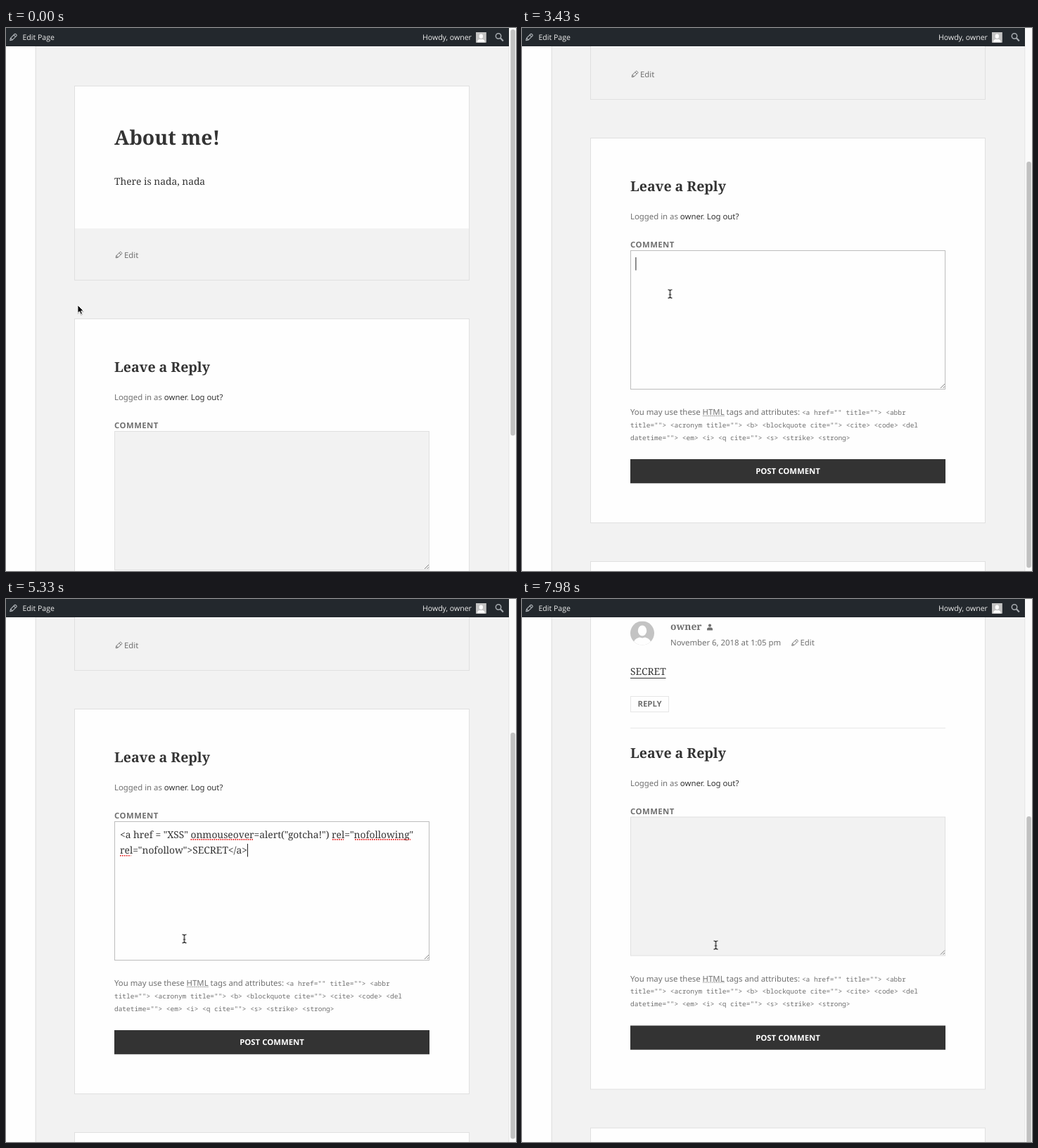
An HTML page for the animation above (8 s loop, 725 by 772 pixels).

```html
<!DOCTYPE html>
<html lang="en">
<head>
<meta charset="utf-8">
<title>Comment form</title>
<style>
html, body { margin: 0; width: 100%; height: 100%; overflow: hidden; background: #f2f2f2; }
svg { display: block; width: 725px; height: 772px; }
text { font: 11.375px "Noto Sans", sans-serif; fill: #707070; white-space: pre; text-rendering: geometricPrecision; }
.serif { font: 13.81px "Noto Serif", serif; fill: #333; }
.b { font-weight: 700; }
.dark { fill: #333; }
.h1 { font-size: 28.44px; }
.h2 { font-size: 19.5px; }
.label { letter-spacing: .04em; }
.code { font: 9.48px "Noto Sans Mono", monospace; }
.bar text { font: 10.56px "Open Sans", sans-serif; fill: #eee; }
.menu text { font: 11.15px Inter, sans-serif; fill: #1c1c1c; }
.menu .off { fill: #b4b4b4; }
.card { fill: #fefefe; stroke: #e0e0e0; }
.field { fill: #f2f2f2; stroke: #e0e0e0; }
.squiggle { stroke: #ee3b3b; stroke-width: 1.8; stroke-dasharray: 1.7 1.3; }

/* All changes are hard cuts: 1% = 80 ms */
.scroll, .thumb, .cursor, .arrow, .beam, .hand, .before, .after, .focus, .typed,
.caret1, .caret2, .menu, .pick, .post { animation: 8s step-end infinite; }
.scroll { animation-name: scroll; }
.thumb { animation-name: thumb; }
.cursor { animation-name: move; }
.arrow { animation-name: arrow; }
.beam { animation-name: beam; }
.hand { animation-name: hand; }
.before { animation-name: before; }
.after { animation-name: after; }
.focus { animation-name: focus; }
.typed { animation-name: typed; }
.caret1 { animation-name: caret1; }
.caret2 { animation-name: caret2; }
.menu { animation-name: menu; }
.pick { animation-name: pick; }
.post { animation-name: post; }

@keyframes scroll {
  0% { transform: translateY(257px); }
  18.75% { transform: translateY(242.5px); }
  20.625% { transform: translateY(180px); }
  22.5% { transform: translateY(100px); }
  24.375% { transform: translateY(40px); }
  26.125% { transform: translateY(10px); }
  28% { transform: translateY(0); }
  90.5% { transform: translateY(-10.5px); }
  96% { transform: translateY(-9.5px); }
  97.875% { transform: translateY(-7.5px); }
  99.75% { transform: translateY(-6.5px); }
}
@keyframes thumb {
  0% { transform: translateY(2px); }
  18.75% { transform: translateY(13px); }
  20.625% { transform: translateY(59px); }
  22.5% { transform: translateY(117px); }
  24.375% { transform: translateY(161px); }
  26.125% { transform: translateY(183px); }
  28% { transform: translateY(190px); }
  90.5% { transform: translateY(311px); }
  97.875% { transform: translateY(309.5px); }
  99.75% { transform: translateY(309px); }
}
@keyframes move {
  0% { transform: translate(102px, 394px); }
  1.875% { transform: translate(98px, 395px); }
  3.75% { transform: translate(95.5px, 394.5px); }
  13.125% { transform: translate(96px, 395px); }
  20.625% { transform: translate(80px, 395px); }
  22.5% { transform: translate(62px, 396px); }
  24.375% { transform: translate(60px, 395px); }
  26.125% { transform: translate(72px, 399px); }
  28% { transform: translate(87px, 404px); }
  31.75% { transform: translate(120px, 398px); }
  33.625% { transform: translate(170px, 386px); }
  35.5% { transform: translate(210.5px, 378px); }
  46.5% { transform: translate(210px, 375px); }
  48.375% { transform: translate(213px, 394px); }
  50.125% { transform: translate(224px, 422px); }
  52% { transform: translate(238px, 457px); }
  53.75% { transform: translate(246px, 481px); }
  61.125% { transform: translate(248px, 483px); }
  63% { transform: translate(251px, 483px); }
  64.75% { transform: translate(253.5px, 483px); }
  68.5% { transform: translate(285px, 510px); }
  70.25% { transform: translate(360px, 585px); }
  72.125% { transform: translate(366px, 602px); }
  73.875% { transform: translate(368px, 606px); }
  77.625% { transform: translate(371.5px, 637px); }
  96% { transform: translate(355px, 622px); }
  97.875% { transform: translate(308px, 545px); }
  99.75% { transform: translate(275.5px, 492px); }
}
@keyframes arrow {
  0%, 46.5%, 70.25% { visibility: visible; }
  33.625%, 61.125%, 77.625% { visibility: hidden; }
}
@keyframes beam {
  0%, 46.5%, 70.25% { visibility: hidden; }
  33.625%, 61.125%, 97.875% { visibility: visible; }
}
@keyframes hand {
  0%, 97.875% { visibility: hidden; }
  77.625% { visibility: visible; }
}
@keyframes before { 0% { visibility: visible; } 90.5% { visibility: hidden; } }
@keyframes after { 0% { visibility: hidden; } 90.5% { visibility: visible; } }
@keyframes focus {
  0%, 77.625% { fill: #f2f2f2; stroke: #e0e0e0; }
  41% { fill: #fefefe; stroke: #bdbdbd; }
}
@keyframes typed { 0%, 90.5% { visibility: hidden; } 61.125% { visibility: visible; } }
@keyframes caret1 { 0%, 61.125% { visibility: hidden; } 41% { visibility: visible; } }
@keyframes caret2 { 0%, 72.125% { visibility: hidden; } 61.125% { visibility: visible; } }
@keyframes menu { 0%, 61.125% { visibility: hidden; } 46.5% { visibility: visible; } }
@keyframes pick {
  0%, 57.5% { fill-opacity: 0; }
  53.75%, 59.375% { fill-opacity: 1; }
}
@keyframes post { 0%, 90.5% { fill: #333; } 77.625% { fill: #707070; } }
</style>
</head>
<body>
<svg viewBox="0 0 725 772">
  <defs>
    <path id="pencil" d="M.7 9.3l.7-3.1L6.7.9q.6-.5 1.2 0L9.1 2.1q.5.6 0 1.2L3.8 8.6zM5.4 2.2l2.4 2.4M1.4 6.2l2.4 2.4" fill="none" stroke-linejoin="round"/>
    <g id="face">
      <rect width="34" height="34" fill="#c3c3c3"/>
      <ellipse cx="17" cy="13.5" rx="6.2" ry="7.5" fill="#fefefe"/>
      <path d="M4 34q0-9 9-11l4 1 4-1q9 2 9 11z" fill="#fefefe"/>
    </g>
    <clipPath id="round"><circle cx="17" cy="17" r="17"/></clipPath>
    <linearGradient id="glass" x2="0" y2="1">
      <stop offset="0" stop-color="#eeeeee"/>
      <stop offset=".72" stop-color="#e6e6e6"/>
      <stop offset=".86" stop-color="#d0d0d0"/>
      <stop offset="1" stop-color="#c6c6c6"/>
    </linearGradient>
    <filter id="shade" x="-20%" y="-20%" width="140%" height="140%">
      <feDropShadow dx="0" dy="3" stdDeviation="4" flood-opacity=".22"/>
    </filter>
    <filter id="soft" x="-50%" y="-50%" width="200%" height="200%">
      <feDropShadow dx="0" dy="1" stdDeviation=".7" flood-opacity=".35"/>
    </filter>
  </defs>

  <rect width="725" height="772" fill="#f2f2f2"/>
  <rect width="42" height="772" fill="#fefefe"/>
  <path d="M42.2 0V772" stroke="#dcdcdc"/>

  <g class="scroll">
    <g class="before">
      <rect class="card" x="97.5" y="-174.5" width="561" height="276"/>
      <rect x="98" y="28" width="560" height="73" fill="#f2f2f2"/>
      <text class="serif b h1" x="154" y="-91">About me!</text>
      <text class="serif" x="154" y="-34.5">There is nada, nada</text>
      <use href="#pencil" x="155.5" y="60.5" stroke="#707070"/>
      <text x="168" y="69.5">Edit</text>
      <rect class="card" x="97.5" y="156.5" width="561" height="547"/>
    </g>

    <g class="after">
      <rect class="card" x="97.5" y="-200" width="561" height="903.5"/>
      <g transform="translate(154 38)" clip-path="url(#round)"><use href="#face"/></g>
      <text class="serif b" x="211" y="50.5" style="fill:#707070">owner</text>
      <circle cx="267" cy="44.2" r="2.1" fill="#707070"/>
      <path d="M263 51v-1.500q0-2.500 2.500-2.500h3q2.500 0 2.500 2.500v1.500z" fill="#707070"/>
      <text x="211" y="72.500">November 6, 2018 at 1:05 pm</text>
      <use href="#pencil" x="383" y="63.500" stroke="#707070"/>
      <text x="395.500" y="72.500">Edit</text>
      <text class="serif" x="154" y="114.500">SECRET</text>
      <path d="M154 119H204.500" stroke="#333"/>
      <rect x="154.500" y="145" width="54" height="22" fill="none" stroke="#e6e6e6"/>
      <text class="b" x="164.500" y="159.500">REPLY</text>
      <path d="M154 190H602" stroke="#e8e8e8"/>
    </g>

    <text class="serif b h2" x="154" y="232">Leave a Reply</text>
    <text x="154" y="272">Logged in as <tspan class="dark">owner</tspan>. <tspan class="dark">Log out?</tspan></text>
    <text class="b label" x="154" y="312">COMMENT</text>
    <rect class="field focus" x="154.5" y="316.5" width="447" height="197"/>
    <path d="M595 512l6-6M598.500 512l2.500-2.500" stroke="#777" stroke-width=".9"/>
    <path class="caret1" d="M161.900 326V344.500" stroke="#222"/>
    <g class="typed">
      <text class="serif" x="162" y="339.5">&lt;a href = "XSS" onmouseover=alert("gotcha!") rel="nofollowing"</text>
      <text class="serif" x="162" y="362">rel="nofollow"&gt;SECRET&lt;/a&gt;</text>
      <path class="squiggle" d="M262.500 342H351M464 342H480M496 342H575M162 364.800H177.500"/>
    </g>
    <path class="caret2" d="M343.500 348V366.500" stroke="#222"/>

    <text x="154" y="550">You may use these HTML tags and attributes: <tspan class="code">&lt;a href="" title=""&gt; &lt;abbr</tspan></text>
    <path d="M257 551.500H288" stroke="#888" stroke-dasharray="1 .6"/>
    <text class="code" x="154" y="567.5">title=""&gt; &lt;acronym title=""&gt; &lt;b&gt; &lt;blockquote cite=""&gt; &lt;cite&gt; &lt;code&gt; &lt;del</text>
    <text class="code" x="154" y="585.5">datetime=""&gt; &lt;em&gt; &lt;i&gt; &lt;q cite=""&gt; &lt;s&gt; &lt;strike&gt; &lt;strong&gt;</text>
    <rect class="post" x="154" y="613" width="448" height="34.3" fill="#333"/>
    <text class="b" x="378" y="634.3" text-anchor="middle" style="fill:#fefefe">POST COMMENT</text>
    <rect class="card" x="97.5" y="758.5" width="561" height="300"/>
  </g>

  <g class="bar">
    <rect width="715" height="26" fill="#23282d"/>
    <use href="#pencil" transform="translate(5 7.500) scale(1.1)" stroke="#b4b9be"/>
    <text x="23.5" y="17">Edit Page</text>
    <text x="592" y="17">Howdy, owner</text>
    <use href="#face" transform="translate(668 6) scale(.43)"/>
    <rect x="668.500" y="6.500" width="13.600" height="13.600" fill="none" stroke="#c3c3c3" stroke-width=".8"/>
    <circle cx="700" cy="11.500" r="3.700" fill="none" stroke="#a5aaaf" stroke-width="1.500"/>
    <path d="M702.800 14.300l4 4.200" stroke="#a5aaaf" stroke-width="2.100"/>
  </g>

  <rect x="715" width="10" height="772" fill="#fafafa"/>
  <path d="M714.800 26V772" stroke="#e6e6e6"/>
  <rect class="thumb" x="717.3" width="6.6" height="577.5" rx="3.3" fill="#c1c1c1"/>

  <g class="menu">
    <rect x="211.500" y="373.500" width="201" height="274.500" rx="5" fill="url(#glass)" stroke="#b9b9b9" stroke-width=".7" filter="url(#shade)"/>
    <path d="M212 397.500H412M212 438.500H412M212 525H412M212 582.500H412M212 608H412" stroke="#000" stroke-opacity=".13"/>
    <rect class="pick" x="212" y="474" width="200.300" height="15.500" fill="#5392f8"/>
    <text x="229" y="388.5">Emoji &amp; Symbols</text>
    <text class="off" x="229" y="413.5">Undo</text>
    <text class="off" x="229" y="429">Redo</text>
    <text class="off" x="229" y="454.5">Cut</text>
    <text class="off" x="229" y="470">Copy</text>
    <text x="229" y="485.5">Paste</text>
    <text class="pick" x="229" y="485.5" style="fill:#fff">Paste</text>
    <text x="229" y="501">Paste and Match Style</text>
    <text class="off" x="229" y="516.5">Select All</text>
    <text x="229" y="541.5">Language Settings</text>
    <text x="229" y="557">Writing Direction</text>
    <circle cx="235.500" cy="569.800" r="6.200" fill="#e3262e"/>
    <text x="245" y="573">PopSnip</text>
    <path d="M395 549l7 4-7 4zM395 565l7 4-7 4z" fill="#222"/>
    <text x="229" y="599.5">Inspect</text>
    <text x="229" y="624.5">OpenPGP: Insert My Key</text>
    <text x="229" y="640">OpenPGP: Insert My Fingerprint</text>
  </g>

  <g class="cursor">
    <path class="arrow" d="M0 0V11.300L2.600 8.900 4.500 13.200 6.500 12.300 4.700 8.200H8.200Z" fill="#000" stroke="#fff" stroke-width=".9" filter="url(#soft)"/>
    <g class="beam" fill="none">
      <path d="M-3-6Q0-6 0-4Q0-6 3-6M0-4.500V4.500M-3 6Q0 6 0 4Q0 6 3 6M-1.500 1H1.500" stroke="#fff" stroke-width="2.400" stroke-opacity=".7"/>
      <path d="M-3-6Q0-6 0-4Q0-6 3-6M0-4.500V4.500M-3 6Q0 6 0 4Q0 6 3 6M-1.500 1H1.500" stroke="#111" stroke-width="1.200"/>
    </g>
    <path class="hand" d="M-2.300 1V-5.300Q-2.300-6.700-1.200-6.700T0-5.300V-1.800Q1.600-2.500 2-1.300Q3.600-1.900 4-.6Q5.700-.8 5.700 1V3Q5.700 4.500 4.800 5.500V7H-1.700V5.800L-5 1.800Q-5.600.7-4.600.2T-2.300 1Z" fill="#fff" stroke="#111" stroke-width=".9" filter="url(#soft)"/>
  </g>
</svg>
</body>
</html>
```
